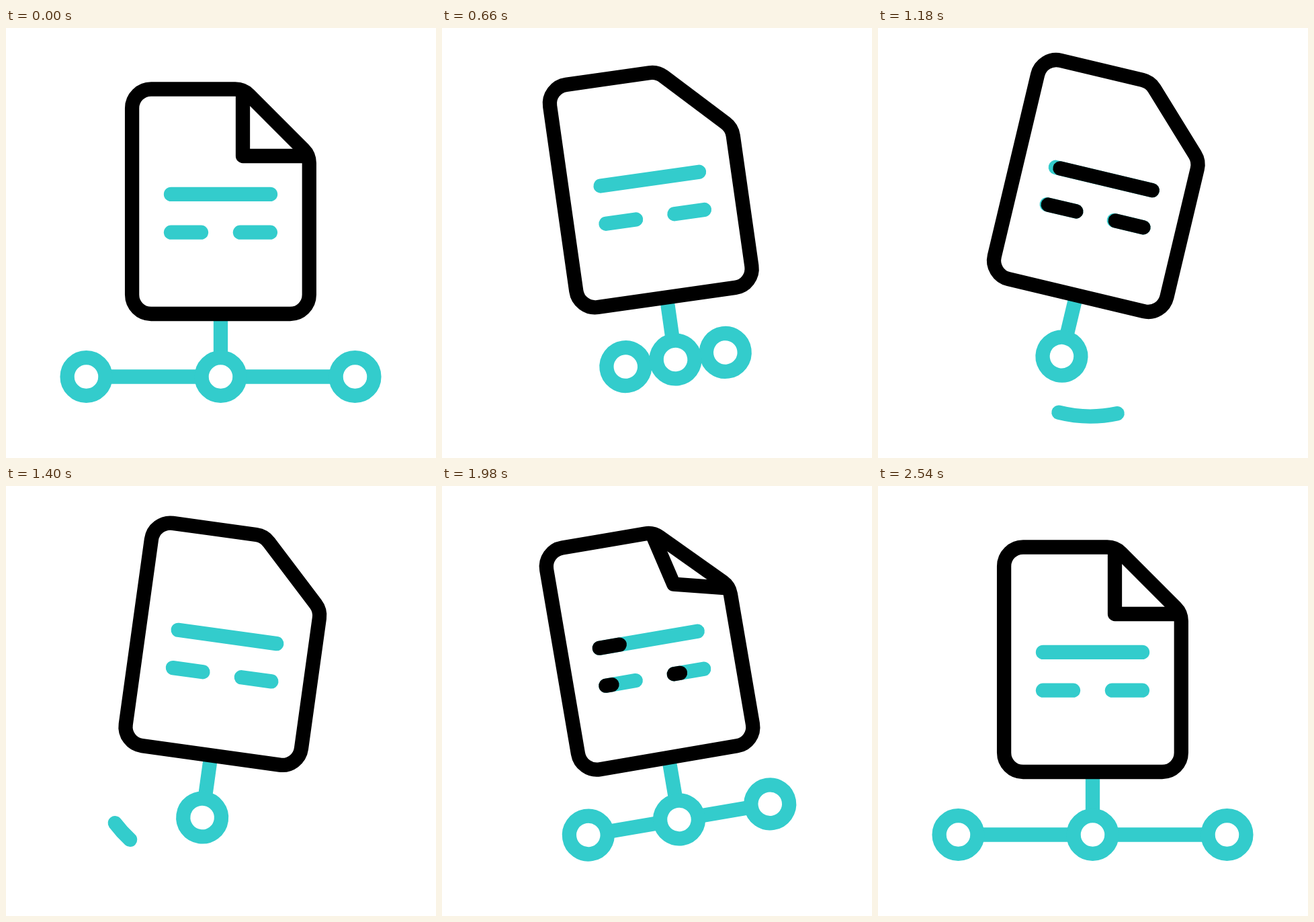
An HTML page with a canvas for the animation above (2800 ms loop, 640 by 640 pixels).

```html
<!DOCTYPE html>
<html lang="en">
<head>
<meta charset="utf-8">
<title>Document network</title>
<style>
  html, body { margin: 0; width: 100%; height: 100%; overflow: hidden; background: #fff; }
  canvas { display: block; width: 640px; height: 640px; }
</style>
</head>
<body>
<canvas id="stage" width="640" height="640"></canvas>
<script>
const ctx = document.getElementById('stage').getContext('2d');
const LOOP = 2800, STEP = 20;
const TEAL = '#33cccc', BLACK = '#000', WEIGHT = 21.3;
const PIVOT = { x: 319.5, y: 320 };
const HUB_Y = 519;

// Each track is a list of [time in ms, value].
const tracks = {
  tilt: [[80, 0], [340, -14.04], [400, -14.6], [660, -8.1], [940, 9.7], [1140, 13.6],
         [1400, 7.9], [1860, -11.6], [1980, -9.7], [2240, -1.6], [2540, 0]],
  lift: [[80, 0], [340, -8.5], [660, -23.5], [940, -24.2], [1150, -25],
         [1400, -23.6], [1760, -23.6], [1980, -19.7], [2240, -6], [2540, 0]],
  spread: [[80, 200], [340, 190.6], [660, 75], [820, 0], [1640, 0], [1980, 137.2], [2240, 189], [2540, 200]],
  fold: [[80, 0], [340, 0.575], [520, 1], [1760, 1], [1980, 0.36], [2240, 0.04], [2400, 0]],
  arcTail: [[900, 30], [940, 37.8], [1170, 76], [1400, 132.9], [1430, 146]],
  arcHead: [[900, 30], [940, 41.2], [1170, 102], [1400, 142.8], [1430, 146]]
};

const inkSweeps = [
  { start: 910, full: 1150, end: 1380 },
  { start: 1910, full: 2150, end: 2390 }
];

const clamp01 = v => Math.max(0, Math.min(1, v));
const ease = v => { v = clamp01(v); return v * v * (3 - 2 * v); };

function slopeAt(keys, i) {
  if (i === 0 || i === keys.length - 1) return 0;
  const [a, b, c] = [keys[i - 1], keys[i], keys[i + 1]];
  const left = (b[1] - a[1]) / (b[0] - a[0]);
  const right = (c[1] - b[1]) / (c[0] - b[0]);
  return left * right <= 0 ? 0 : 2 * left * right / (left + right);
}

// Smooth interpolation that never overshoots its keys.
function sample(keys, t) {
  const last = keys.length - 1;
  if (t <= keys[0][0]) return keys[0][1];
  if (t >= keys[last][0]) return keys[last][1];
  let i = 0;
  while (t >= keys[i + 1][0]) i++;
  const [t0, v0] = keys[i], [t1, v1] = keys[i + 1];
  const span = t1 - t0, u = (t - t0) / span;
  const blend = u * u * (3 - 2 * u);
  return v0 + (v1 - v0) * blend
    + span * u * (1 - u) * ((1 - u) * slopeAt(keys, i) - u * slopeAt(keys, i + 1));
}

function line(color, ...points) {
  ctx.strokeStyle = color;
  ctx.beginPath();
  points.forEach(([x, y]) => ctx.lineTo(x, y));
  ctx.stroke();
}

function ring(x, y) {
  ctx.beginPath();
  ctx.arc(x, y, 28.4, 0, Math.PI * 2);
  ctx.fillStyle = '#fff';
  ctx.fill();
  ctx.strokeStyle = TEAL;
  ctx.stroke();
}

function drawNetwork(spread) {
  line(TEAL, [PIVOT.x, 425], [PIVOT.x, 488]);
  if (spread > 1) {
    line(TEAL, [PIVOT.x - spread, HUB_Y], [PIVOT.x + spread, HUB_Y]);
    ring(PIVOT.x - spread, HUB_Y);
    ring(PIVOT.x + spread, HUB_Y);
  }
  ring(PIVOT.x, HUB_Y);
}

function drawPage(fold) {
  const corners = [[353, 91], [451.3, 189.3], [451.3, 425.5], [187.6, 425.5], [187.6, 91]];
  ctx.beginPath();
  ctx.moveTo(270, 91);
  corners.forEach(([x, y], i) => {
    const next = corners[(i + 1) % corners.length];
    ctx.arcTo(x, y, ...next, 28.4);
  });
  ctx.closePath();
  ctx.fillStyle = '#fff';
  ctx.fill();
  ctx.strokeStyle = BLACK;
  ctx.stroke();
  if (fold < 0.995) {
    line(BLACK, [352.5, 98], [352.5 + 49.7 * fold, 190.5 - 50.3 * fold], [444, 190.5]);
  }
}

function drawTextBar(x, y, width, t) {
  ctx.lineCap = 'round';
  line(TEAL, [x, y], [x + width, y]);
  for (const { start, full, end } of inkSweeps) {
    if (t <= start || t >= end) continue;
    const head = ease((t - start) / (full - start));
    const tail = ease((t - full) / (end - full));
    line(BLACK, [x + width * tail, y], [x + width * head, y]);
  }
  ctx.lineCap = 'butt';
}

function drawArc(t) {
  const tail = sample(tracks.arcTail, t), head = sample(tracks.arcHead, t);
  if (head - tail < 0.1) return;
  const rad = Math.PI / 180;
  ctx.lineCap = 'round';
  ctx.strokeStyle = TEAL;
  ctx.beginPath();
  ctx.arc(316, 385, 193, tail * rad, head * rad);
  ctx.stroke();
  ctx.lineCap = 'butt';
}

function draw(t) {
  ctx.fillStyle = '#fff';
  ctx.fillRect(0, 0, 640, 640);
  ctx.lineWidth = WEIGHT;
  ctx.lineJoin = 'round';
  ctx.lineCap = 'butt';
  drawArc(t);

  ctx.save();
  ctx.translate(PIVOT.x, PIVOT.y + sample(tracks.lift, t));
  ctx.rotate(sample(tracks.tilt, t) * Math.PI / 180);
  ctx.translate(-PIVOT.x, -PIVOT.y);
  drawNetwork(sample(tracks.spread, t));
  drawPage(sample(tracks.fold, t));
  drawTextBar(245.5, 247.4, 148, t);
  drawTextBar(245.5, 304.2, 45, t);
  drawTextBar(348.4, 304.2, 45, t);
  ctx.restore();
}

const origin = performance.now();
function tick() {
  const t = (performance.now() - origin) % LOOP;
  draw(Math.floor(t / STEP) * STEP);
  requestAnimationFrame(tick);
}
tick();
</script>
</body>
</html>
```
